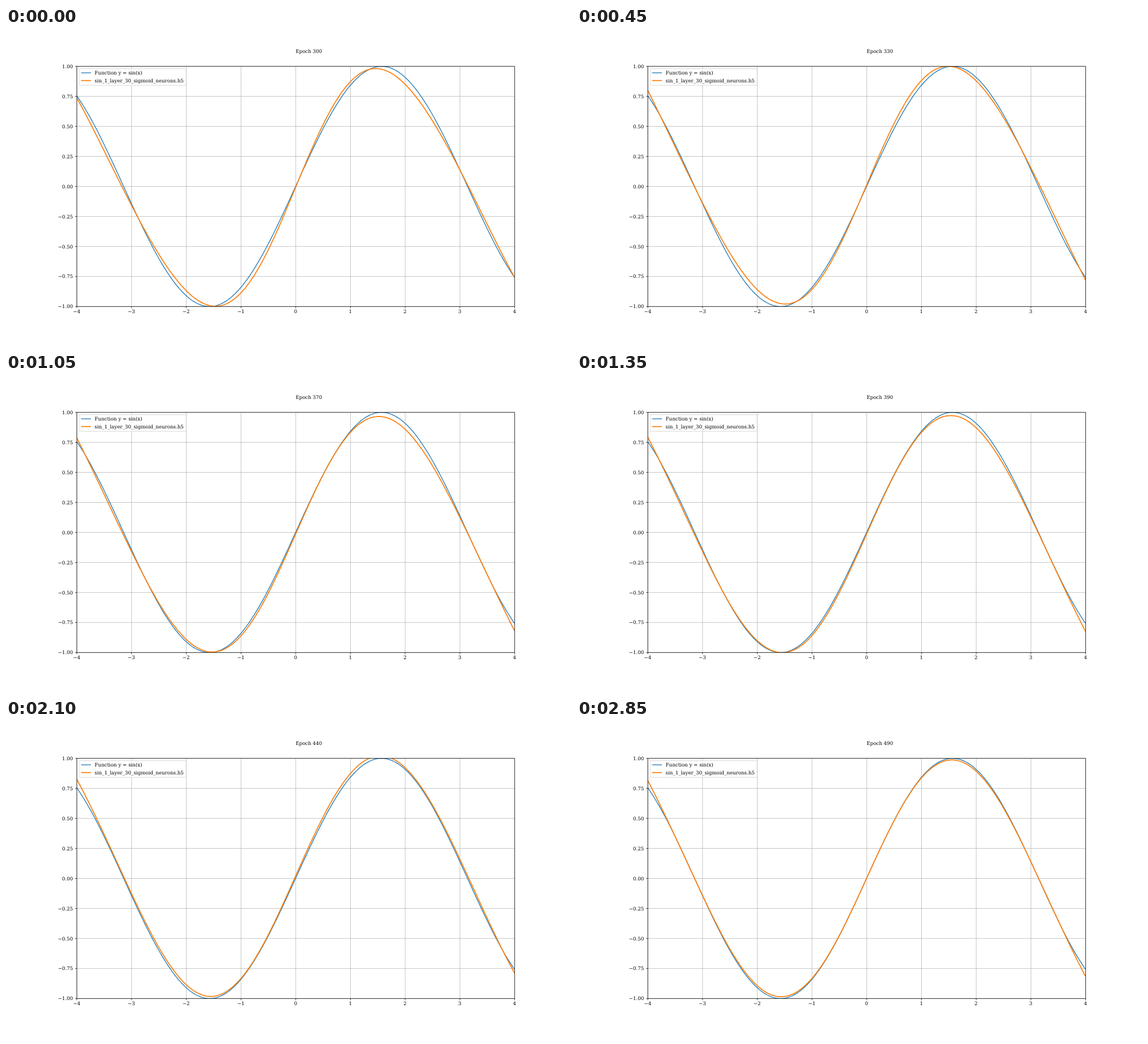
An HTML page for the animation above (3000 ms loop, 998 px wide and 561 px high).

```html
<!DOCTYPE html>
<html lang="en">
<head>
<meta charset="utf-8">
<title>Sine fit by epoch</title>
<style>
  html, body { margin: 0; width: 100%; height: 100%; overflow: hidden; background: #fff; }
  svg { display: block; width: 998px; height: 561px; }
  text { font: 8.69px "DejaVu Serif", "Noto Serif", serif; text-rendering: geometricPrecision; }
</style>
</head>
<body>
<svg id="plot" viewBox="0 0 998 561"></svg>
<script>
const STEP = 150, STEPS = 20, FIRST_EPOCH = 300;
const LEFT = 124.8, RIGHT = 898.2, TOP = 67.7, BOTTOM = 491.3;
const GRID_SHIFT = 0.3;
const BLUE = '#1f77b4', ORANGE = '#ff7f0e', GREY = '#b0b0b0';

// How the fit misses the sine, in thousandths, at a few key steps.
const KEYS = [
  { step: 0, bias: -8, gain: -5, wave: 50, ends: 33 },
  { step: 3, bias: 11, gain: -5, wave: 39, ends: 68 },
  { step: 5, bias: -16, gain: -21, wave: 30, ends: 80 },
  { step: 9, bias: -14, gain: -10, wave: 15, ends: 72 },
  { step: 12, bias: 37, gain: 4, wave: 11, ends: 63 },
  { step: 16, bias: 2, gain: 4, wave: 9, ends: 48 },
  { step: 19, bias: 1, gain: -13, wave: 5, ends: 73 }
];

const svg = document.getElementById('plot');
const px = x => LEFT + (x + 4) / 8 * (RIGHT - LEFT);
const py = y => TOP + (1 - y) / 2 * (BOTTOM - TOP);
const label = (v, digits) => v.toFixed(digits).replace('-', '\u2212');

function add(tag, attrs, parent = svg) {
  const el = document.createElementNS('http://www.w3.org/2000/svg', tag);
  for (const k in attrs) el.setAttribute(k, attrs[k]);
  return parent.appendChild(el);
}
const line = (x1, y1, x2, y2, stroke, width = 0.75) =>
  add('line', { x1, y1, x2, y2, stroke, 'stroke-width': width });

function write(str, x, y, anchor = 'start') {
  const el = add('text', { x, y, 'text-anchor': anchor });
  el.textContent = str;
  return el;
}

function curve(f) {
  let d = '';
  for (let i = 0; i <= 320; i++) {
    const x = -4 + i / 40;
    d += (i ? 'L' : 'M') + px(x).toFixed(2) + ' ' + py(f(x)).toFixed(2);
  }
  return d;
}

function keyAt(step) {
  const n = Math.max(1, KEYS.findIndex(k => k.step >= step));
  const a = KEYS[n - 1], b = KEYS[n], t = (step - a.step) / (b.step - a.step);
  const mix = {};
  for (const k in a) mix[k] = a[k] + (b[k] - a[k]) * t;
  return mix;
}

// A sine with a bias, a gain error, a faster ripple and straightened ends.
function fitAt(step) {
  const { bias, gain, wave, ends } = keyAt(step);
  return x => {
    const past = Math.max(0, Math.abs(x) - 3);
    const miss = bias + gain * Math.sin(x) + wave * Math.sin(2.14 * x)
      - ends * Math.sign(x) * past ** 3;
    return Math.sin(x) + miss / 1000;
  };
}

const fits = Array.from({ length: STEPS }, (_, step) => curve(fitAt(step)));
const xs = Array.from({ length: 9 }, (_, i) => i - 4);
const ys = xs.map(v => v / 4);
const left = LEFT + GRID_SHIFT, right = RIGHT + GRID_SHIFT;

for (const x of xs) line(px(x) + GRID_SHIFT, TOP, px(x) + GRID_SHIFT, BOTTOM, GREY);
for (const y of ys) line(left, py(y), right, py(y), GREY);

const clip = add('clipPath', { id: 'area' });
add('rect', { x: LEFT, y: TOP, width: RIGHT - LEFT, height: BOTTOM - TOP }, clip);
const lines = add('g', { 'clip-path': 'url(#area)', fill: 'none', 'stroke-linejoin': 'round' });
add('path', { d: curve(Math.sin), stroke: BLUE, 'stroke-width': 1.3 }, lines);
const fit = add('path', { stroke: ORANGE, 'stroke-width': 1.75 }, lines);

add('rect', {
  x: left, y: TOP, width: right - left, height: BOTTOM - TOP,
  fill: 'none', stroke: '#000', 'stroke-width': 0.75
});
for (const x of xs) {
  line(px(x) + GRID_SHIFT, BOTTOM, px(x) + GRID_SHIFT, BOTTOM + 3, '#000');
  write(label(x, 0), px(x), 503.4, 'middle');
}
for (const y of ys) {
  line(left - 3, py(y), left, py(y), '#000');
  write(label(y, 2), 118.4, py(y) + 3.1, 'end');
}

add('rect', {
  x: 129, y: 71.8, width: 189.2, height: 29.4, rx: 1.8,
  fill: '#fff', 'fill-opacity': 0.8, stroke: '#ccc', 'stroke-opacity': 0.8, 'stroke-width': 0.9
});
line(132.6, 79.1, 150, 79.1, BLUE, 1.3);
line(132.6, 92.7, 150, 92.7, ORANGE, 1.75);
write('Function y = sin(x)', 156.6, 82.1);
write('sin_1_layer_30_sigmoid_neurons.h5', 156.6, 95.7);

const title = write('', 511.5, 44.2);

let shown = -1;
function tick() {
  const step = Math.floor(performance.now() % (STEP * STEPS) / STEP);
  if (step !== shown) {
    shown = step;
    fit.setAttribute('d', fits[step]);
    title.textContent = 'Epoch ' + (FIRST_EPOCH + step * 10);
  }
  requestAnimationFrame(tick);
}
tick();
</script>
</body>
</html>
```
